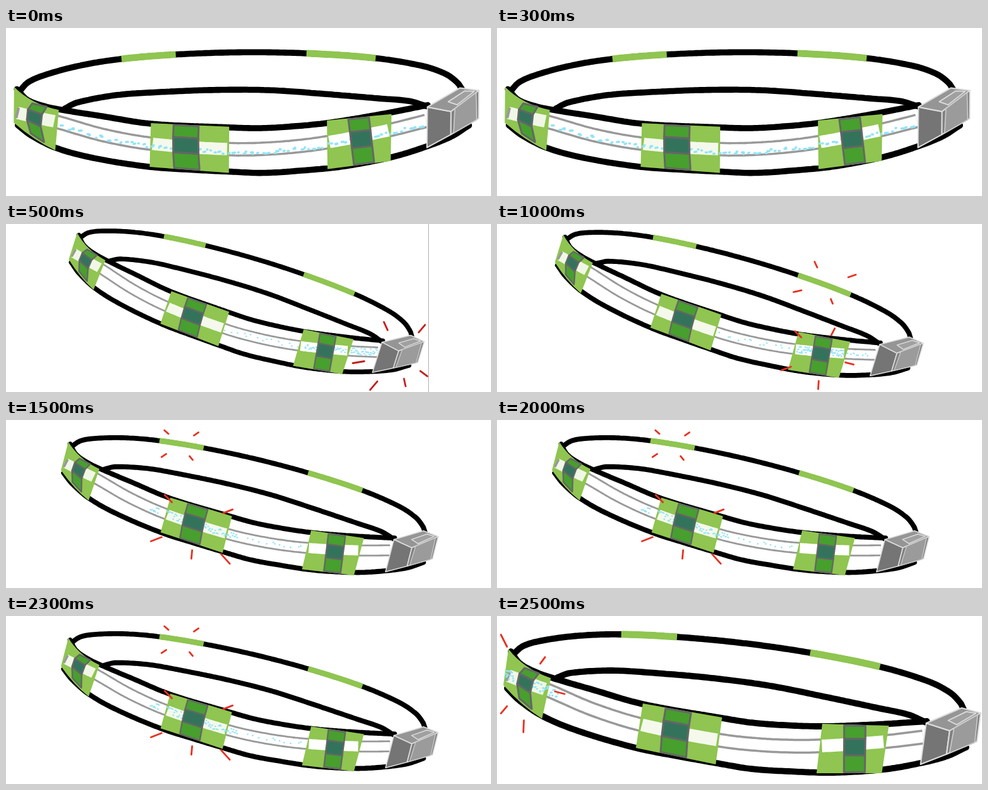
Animation, 765 px wide and 265 px high, one loop 3 s. Source, as an HTML page:

```html
<!DOCTYPE html>
<html lang="en">
<head>
<meta charset="utf-8">
<title>Clip belt</title>
<style>
  html, body { margin: 0; width: 100%; height: 100%; overflow: hidden; background: #fff; }
  svg { display: block; width: 765px; height: 265px; }
</style>
</head>
<body>
<svg id="stage" viewBox="0 0 765 265" fill="none" stroke-linejoin="round" stroke-linecap="round">
  <g id="belt"></g>
  <path id="rays" stroke-width="2.8"/>
  <path id="rule" stroke="#b0b0b0" stroke-linecap="butt" d="M666.5,0V265"/>
</svg>
<script>
const STEP = 500;
const ORDER = [0, 1, 2, 3, 3, 4];
const LIME = '#8fc550', GREEN = '#479f2e', TEAL = '#33735c', GREY = '#999';

const pts = s => s.split(' ').map(p => p.split(',').map(Number));
const mix = (a, b, k) => [a[0] + (b[0] - a[0]) * k, a[1] + (b[1] - a[1]) * k];
const fix = p => p.map(n => n.toFixed(1)).join();

// A smooth height y(x) through a few key points
function track(text) {
  const p = pts(text), last = p.length - 1;
  const slope = i => {
    const a = p[Math.max(i - 1, 0)], b = p[Math.min(i + 1, last)];
    return (b[1] - a[1]) / (b[0] - a[0]);
  };
  const y = x => {
    let i = 0;
    while (i < last - 1 && x > p[i + 1][0]) i++;
    const w = p[i + 1][0] - p[i][0], t = (x - p[i][0]) / w, s = 1 - t;
    return p[i][1] * (1 + 2 * t) * s * s + p[i + 1][1] * (1 + 2 * s) * t * t +
      w * t * s * (slope(i) * s - slope(i + 1) * t);
  };
  return { y, from: p[0][0], to: p[last][0] };
}

const BACK = track('24,62 40,48 70,39 130,31 196,29 284,33 390,43 494,58 604,80 680,103 715,121 731,137 736,147');
const INNER = track('95,97 115,90 180,86 250,90 340,98 430,110 520,128 600,145 650,156 677,168');
const TOP = track('22,56 35,74 60,88 95,100 150,116 230,139 355,161 400,168 450,172 513,174 600,171 678,166');
const BASE = track('16,114 35,133 72,158 130,182 219,208 290,222 346,232 400,241 460,245 530,247 610,242 668,232 710,221 740,207');
const BAND = track('12,92 60,110 80,117 150,147 226,171 351,196 430,204 509,205 613,198 672,191');

// Corners TL TR BR BL; the strip starts at u, leans and bows with v, and tilts on the left clip
const CLIPS = [
  { quad: '18,52 85,98 71,162 10,109', u: .3, lean: 0, bow: .12, tilt: .17, sag: .11, fill: '#f1f7e6' },
  { quad: '230,138 355,160 345,234 219,208', u: .28, lean: .02, bow: .01, tilt: 0, sag: 0, fill: '#f4f9ec' },
  { quad: '513,170 618,173 607,248 504,248', u: .33, lean: .09, bow: 0, tilt: 0, sag: 0, fill: '#fff' }
];
const BOX = pts('677,169 733,145 763,153 714,181 757,198 709,218 668,234');

// place: x, y, degrees, scale of the belt. dots: from x, to x, count, spread.
// bursts: a centre, then the middle of each ray around it.
const POSES = [
  { place: [-11, 45, -7.29, .975], dots: [[85, 670, 95, 3]], sink: 5, dash: 3, bursts: [] },
  {
    place: [105.4, -27.3, 9.65, .763], color: '#c3201c', rule: true,
    dots: [[352, 515, 15, 4], [520, 607, 40, 5], [616, 670, 36, 7]],
    bursts: ['620,207 599,161 656,165 556,218 659,236 580,255 629,250']
  },
  {
    place: [97, -25.7, 9.04, .789],
    dots: [[356, 506, 14, 4], [515, 609, 85, 7], [614, 658, 8, 3]],
    bursts: ['518,96 503,64 560,82 474,106 528,122', '510,208 475,174 530,170 456,228 556,220 507,254']
  },
  {
    place: [88.8, -8.5, 6.63, .801],
    dots: [[194, 212, 9, 5], [227, 345, 52, 7], [345, 371, 12, 5], [389, 506, 11, 3]],
    bursts: ['275,39 253,19 300,22 249,56 292,60', '297,165 256,124 350,144 237,188 293,212 346,219']
  },
  {
    place: [0, 0, 0, 1],
    dots: [[13, 26, 15, 8], [55, 96, 26, 7]],
    bursts: ['45,107 11,39 72,70 99,121 11,148 42,174']
  }
];

const path = (d, stroke, w, cap = 'round') =>
  `<path d="${d}" stroke="${stroke}" stroke-width="${w}" stroke-linecap="${cap}"/>`;
const poly = (list, fill, stroke = 'none', w = 0) =>
  `<polygon points="${list.map(fix).join(' ')}" fill="${fill}" stroke="${stroke}" stroke-width="${w}"/>`;

function curve(t, from = t.from, to = t.to) {
  const n = Math.ceil((to - from) / 4);
  return 'M' + Array.from({ length: n + 1 }, (_, i) => {
    const x = from + (to - from) * i / n;
    return fix([x, t.y(x)]);
  }).join('L');
}

// Point at (u, v) between four corners
const inside = q => (u, v) => mix(mix(q[0], q[1], u), mix(q[3], q[2], u), v);

function random(seed) {
  return () => (seed = (seed * 16807) % 2147483647) / 2147483647;
}

function clip({ quad, sag, fill }) {
  const q = pts(quad), at = inside(q);
  const left = mix(q[0], q[3], .5)[0], right = mix(q[1], q[2], .4)[0];
  const shape = `M${fix(q[0])}Q${fix(at(.4, 2 * sag))} ${fix(q[1])}L${fix(q[2])}Q${fix(at(.5, 1 + sag))} ${fix(q[3])}Z`;
  return `<path d="${shape}" fill="${LIME}"/>` +
    path(curve(BAND, left + 4, right - 4), fill, 20, 'butt') +
    (sag ? path(curve(BAND, left + 2, left + 6), GREY, 17, 'butt') : '');
}

function strip({ quad, u, lean, bow, tilt }) {
  const at = inside(pts(quad));
  const rows = [.02, .29, .63, .98].map(v => {
    const x = u + lean * v + bow * (2 * v - 1) ** 2, drop = tilt * (1 - v);
    return [at(x, v + drop), at(x + .32, v + drop / 3)];
  });
  return [0, 2, 1].map(i => poly(
    [...rows[i], ...rows[i + 1].slice().reverse()], i === 1 ? TEAL : GREEN, '#666', 3)).join('');
}

function box([A, B, C, D, E, F, G]) {
  const lid = inside([A, B, C, D]), side = inside([D, C, E, F]);
  return poly([A, D, F, G], '#757575', '#ddd', 2) +
    poly([A, B, C, D], '#959595', '#ddd', 2) +
    poly([D, C, E, F], '#808080', '#ddd', 2) +
    poly([side(.14, 0), side(.9, 0), side(.93, 1), side(.1, 1)], '#9b9b9b', '#ccc', 1.6) +
    poly([lid(.36, .42), lid(.9, .42), lid(.94, .85), lid(.3, .9)], '#a0a0a0', '#ddd', 1.8);
}

function dots({ dots, sink = 0, dash = .8 }, seed) {
  const rnd = random(seed);
  let d = '';
  for (const [from, to, n, spread] of dots) {
    for (let i = 0; i < n; i++) {
      const x = from + (to - from) * (i + rnd()) / n;
      d += `M${fix([x, BAND.y(x) + sink + (rnd() * 2 - 1) * spread])}l${fix([.3 + rnd() * dash, rnd() - .5])}`;
    }
  }
  return d;
}

// Each ray points at its centre and grows with the distance from it
function burst(text) {
  const [centre, ...rays] = pts(text);
  return rays.map(p => `M${fix(mix(centre, p, .86))}L${fix(mix(centre, p, 1.14))}`).join('');
}

const $ = id => document.getElementById(id);
$('belt').innerHTML =
  [BACK, INNER, TOP, BASE].map(t => path(curve(t), '#000', 9.8)).join('') +
  path(curve(BACK, 196, 284) + curve(BACK, 494, 604), LIME, 11, 'butt') +
  path(curve(BAND, 70), GREY, 23.5, 'butt') + path(curve(BAND, 70), '#fff', 16.5, 'butt') +
  CLIPS.map(clip).join('') +
  '<path id="dots" stroke="#92e4f8"/>' +
  CLIPS.map(strip).join('') + box(BOX);

const scenes = POSES.map((pose, i) => {
  const [x, y, turn, scale] = pose.place;
  return {
    place: `translate(${x} ${y}) rotate(${turn}) scale(${scale})`,
    dots: dots(pose, 41 + i * 977),
    size: pose.dash ? 3.6 : 2.8,
    rays: pose.bursts.map(burst).join(''),
    color: pose.color || '#e8301f',
    rule: pose.rule ? 'inline' : 'none'
  };
});

function show(ms) {
  const s = scenes[ORDER[Math.floor(ms / STEP) % ORDER.length]];
  $('belt').setAttribute('transform', s.place);
  $('dots').setAttribute('d', s.dots);
  $('dots').setAttribute('stroke-width', s.size);
  $('rays').setAttribute('d', s.rays);
  $('rays').setAttribute('stroke', s.color);
  $('rule').setAttribute('display', s.rule);
}

const start = performance.now();
function tick() {
  show(performance.now() - start);
  requestAnimationFrame(tick);
}
tick();
</script>
</body>
</html>
```
